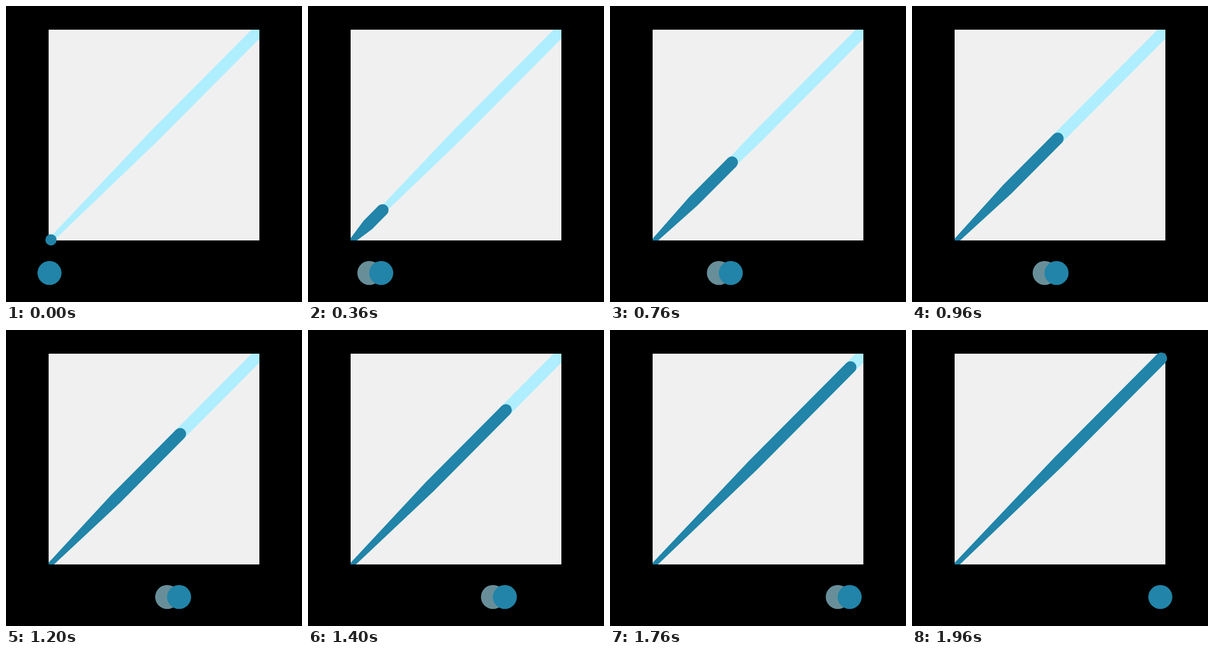
An HTML page with a canvas that plays this animation: 500x500 px, repeating every 3000 ms.

```html
<!DOCTYPE html>
<html lang="en">
<head>
<meta charset="utf-8">
<title>Linear motion</title>
<style>
  html, body { margin: 0; width: 100%; height: 100%; overflow: hidden; background: #000; }
  canvas { display: block; }
</style>
</head>
<body>
<canvas id="stage" width="500" height="500"></canvas>
<script>
const ctx = document.getElementById('stage').getContext('2d');

const LOOP = 3000, TICK = 40;
const START = 110, SPEED = 0.2008, TRAVEL = 346, GHOST_LAG = 100;
const PANEL = { x: 72, y: 40, size: 356 };
const BASE = { x: 76, y: 395 }, TOP = { x: 421, y: 48 };
const DARK = '#2184a8', LIGHT = '#aeeeff', GHOST = 'rgba(174, 238, 255, 0.6)';

const distanceAt = time => Math.min(TRAVEL, Math.max(0, (time - START) * SPEED));

function disc(x, y, radius, color) {
  ctx.fillStyle = color;
  ctx.beginPath();
  ctx.arc(x, y, radius, 0, Math.PI * 2);
  ctx.fill();
}

function clipped(draw) {
  ctx.save();
  ctx.beginPath();
  ctx.rect(PANEL.x, PANEL.y, PANEL.size, PANEL.size);
  ctx.clip();
  draw();
  ctx.restore();
}

// Widens over the first half of its length, then keeps its full width.
function taper(tip, color) {
  const length = Math.hypot(tip.x - BASE.x, tip.y - BASE.y);
  ctx.save();
  ctx.translate(BASE.x, BASE.y);
  ctx.rotate(Math.atan2(tip.y - BASE.y, tip.x - BASE.x));
  ctx.fillStyle = color;
  ctx.beginPath();
  ctx.moveTo(-6, -4);
  ctx.lineTo(length / 2, -10);
  ctx.lineTo(length, -10);
  ctx.lineTo(length, 10);
  ctx.lineTo(length / 2, 10);
  ctx.lineTo(-6, 4);
  ctx.fill();
  ctx.restore();
}

function render(time) {
  const distance = distanceAt(time);
  const ghost = distanceAt(time - GHOST_LAG);
  const progress = distance / TRAVEL;
  const tip = {
    x: BASE.x + (TOP.x - BASE.x) * progress,
    y: BASE.y + (TOP.y - BASE.y) * progress
  };

  ctx.fillStyle = '#000';
  ctx.fillRect(0, 0, 500, 500);
  ctx.fillStyle = '#f0f0f0';
  ctx.fillRect(PANEL.x, PANEL.y, PANEL.size, PANEL.size);

  clipped(() => {
    taper(TOP, LIGHT);
    disc(TOP.x, TOP.y, 10, LIGHT);
    if (distance > 0) taper(tip, DARK);
  });
  disc(tip.x, tip.y, distance > 0 ? 10 : 9.5, DARK);

  if (ghost < distance) disc(73.5 + ghost, 451, 20.3, GHOST);
  disc(73.5 + distance, 451, 20.3, DARK);
}

function frame() {
  const time = performance.now() % LOOP;
  render(Math.floor(time / TICK) * TICK);
  requestAnimationFrame(frame);
}
frame();
</script>
</body>
</html>
```
